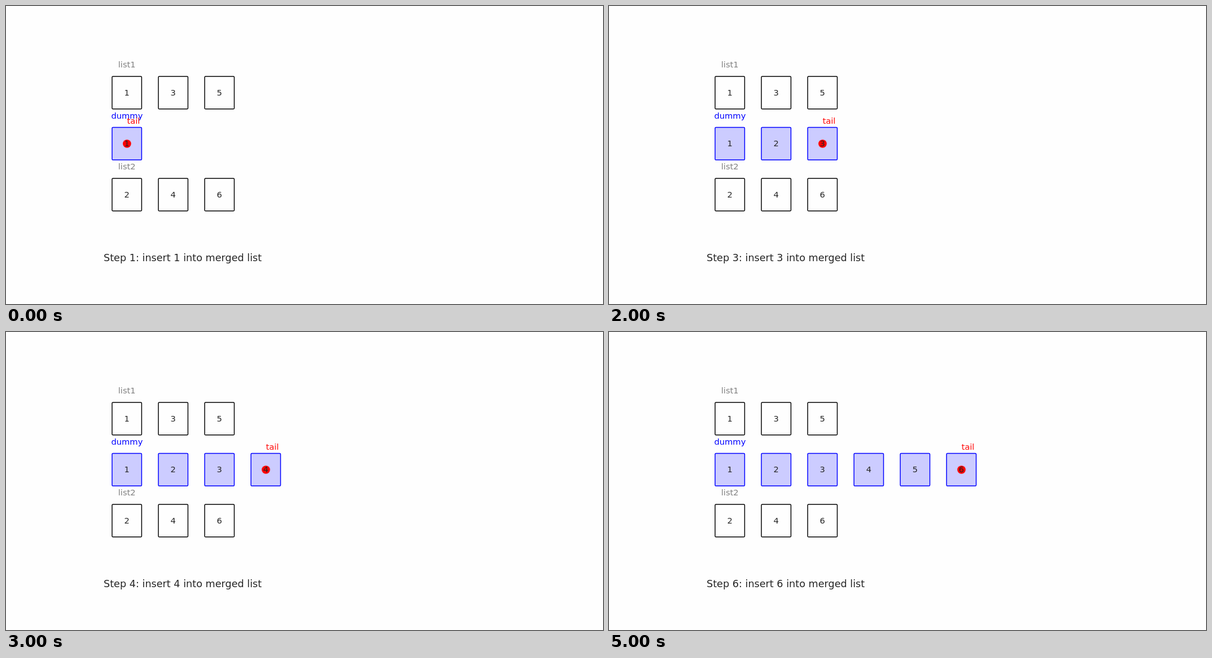
These frames come from a looping animation (1058 px wide and 529 px high, 6 s). An HTML page:

```html
<!DOCTYPE html>
<html lang="en">
<head>
<meta charset="utf-8">
<title>Merging two sorted lists</title>
<style>
  html, body { margin: 0; width: 100%; height: 100%; overflow: hidden; background: #fefefe; }
  svg { display: block; width: 1058px; height: 529px; }
  text { font: 14.7px "DejaVu Sans", sans-serif; fill: #262626; white-space: pre; }
  .mid { text-anchor: middle; }
  .caption { font-size: 17.64px; }
  .node { fill: #fefefe; stroke: #000; stroke-width: 1.47; }
  .merged { fill: #ccccff; stroke: #0000ff; }
</style>
</head>
<body>
<svg id="stage" viewBox="0 0 1058 529"></svg>
<script>
const STEPS = 6, STEP_MS = 1000;
const X0 = 214.2, GAP = 82.05, BOX_W = 52.4, BOX_H = 57.8;
const ROW = { list1: 153.9, merged: 244.4, list2: 334.9 };
const stage = document.getElementById('stage');

function add(tag, attrs, content = '') {
  const el = document.createElementNS('http://www.w3.org/2000/svg', tag);
  for (const key in attrs) el.setAttribute(key, attrs[key]);
  el.textContent = content;
  return stage.appendChild(el);
}

const nodeX = i => X0 + i * GAP;

const box = (i, y, cls = 'node') => add('rect', {
  x: nodeX(i) - BOX_W / 2, y: y - BOX_H / 2, width: BOX_W, height: BOX_H, rx: 1.6, class: cls
});

const label = (x, y, str, color, cls = 'mid') =>
  add('text', { x, y, class: cls, style: color ? `fill:${color}` : '' }, str);

const value = (i, y, n) => label(nodeX(i), y + 4.6, n);

function loop(el, frames, easing) {
  el.animate(frames, { duration: STEPS * STEP_MS, iterations: Infinity, easing });
}

// Show an element from step a up to, but not including, step b.
function during(el, a, b = STEPS) {
  const frames = [];
  for (let i = 0; i <= STEPS; i++) {
    frames.push({ offset: i / STEPS, opacity: i >= a && i < b ? 1 : 0, easing: 'step-end' });
  }
  loop(el, frames, 'linear');
}

function follow(el) {
  loop(el, [
    { transform: 'translateX(0px)' },
    { transform: `translateX(${STEPS * GAP}px)` }
  ], `steps(${STEPS}, end)`);
}

[['list1', [1, 3, 5]], ['list2', [2, 4, 6]]].forEach(([name, values]) => {
  const y = ROW[name];
  label(X0, y - 44.9, name, '#808080');
  values.forEach((n, i) => { box(i, y); value(i, y, n); });
});

for (let i = 0; i < STEPS; i++) during(box(i, ROW.merged, 'node merged'), i);
follow(add('circle', { cx: X0 + 0.2, cy: ROW.merged + 0.1, r: 7.35, fill: '#ff0000' }));

for (let i = 0; i < STEPS; i++) {
  const n = i + 1;
  during(value(i, ROW.merged, n), i);
  during(label(173, 453, `Step ${n}: insert ${n} into merged list`, '', 'caption'), i, n);
}

label(X0 + 0.2, 199.6, 'dummy', '#0000ff');
follow(label(X0 + 0.2, 208.6, 'tail', '#ff0000', ''));
</script>
</body>
</html>
```
